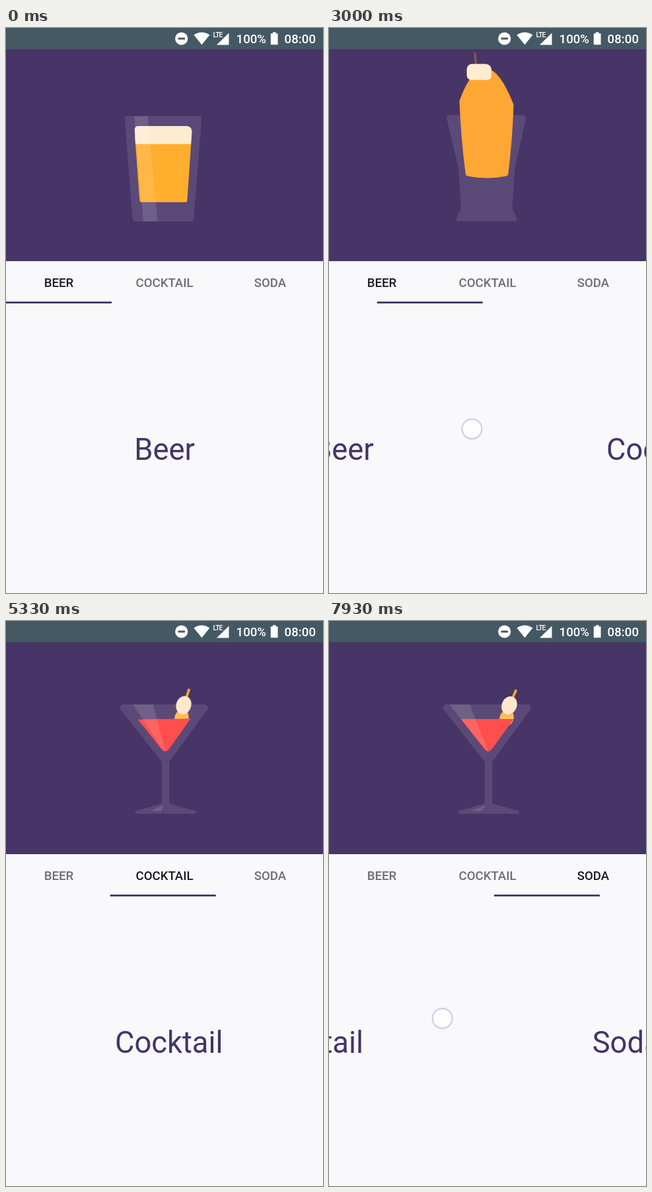
Recreate the animation shown at these times as an HTML page with a canvas. Size 480x853 px, loop 8000 ms.

```html
<!DOCTYPE html>
<html lang="en">
<head>
<meta charset="utf-8">
<title>Drinks pager</title>
<style>
html, body { margin: 0; width: 100%; height: 100%; overflow: hidden; background: #f9f8fb; }
canvas { display: block; width: 480px; height: 853px; }
</style>
</head>
<body>
<canvas id="stage" width="480" height="853"></canvas>
<script>
const ctx = document.getElementById('stage').getContext('2d');
const LOOP = 8000, W = 480, HERO_END = 352;
const FONT = 'Roboto, "Noto Sans", sans-serif';
const HERO = '#483567', BAR = '#455964', INK = '#433468', PAPER = '#f9f8fb';
const PAGES = ['Beer', 'Cocktail', 'Soda'];

const clamp = v => Math.max(0, Math.min(1, v));
const ramp = (v, a, b) => clamp((v - a) / (b - a));
const smooth = u => u * u * (3 - 2 * u);
const easeOut = u => u * (2 - u);
const mix = (a, b, u) => a.map((v, i) => v + (b[i] - v) * u);

// Keys are [position, ...values]; returns the blended values.
function at(keys, v) {
  let i = 0;
  while (i < keys.length - 2 && v > keys[i + 1][0]) i++;
  const a = keys[i], b = keys[i + 1];
  return mix(a, b, ramp(v, a[0], b[0])).slice(1);
}

// Pager position: a slow drag, a fling that settles, then a second drag.
function scroll(t) {
  const u = ramp(t, 1000, 4490);
  const drag = u + .096 * u * (1 - u);
  const settle = easeOut(ramp(t, 4490, 5600));
  return .762 * drag + .238 * settle + Math.max(0, t - 6090) * .0003055;
}

const TOUCHES = [
  { from: 1000, to: 4770, page: 0, x: 434.7, y: 614.8 },
  { from: 6070, to: LOOP, page: 1, x: 441.5, y: 600.4 }
];

// Right half of each glass: distance from centre, y, corner radius, centre
const TUMBLER = [[58.5, 133, 4, 238], [52.3, 212, 0, 238], [47.5, 272, 0, 238], [46.2, 288, 0, 238], [45.8, 292, 4, 238]];
const MARTINI = [[71.5, 126, 5, 239], [5.7, 212.5, 3, 241.5], [5.7, 275.5, 2, 241.5], [46, 287, 2, 241.5], [46, 291, 2, 241.5]];

// Body of the drink: top y, top half width, bottom y, bottom half width, side bulge, base drop, rounding
const BODY = [
  [.34, 165, 39.8, 260, 33, 0, 0, 6],
  [.584, 140, 35, 175, 24, 5, 13, 8],
  [.76, 148, 39, 191, 7, 0, 11, 1],
  [1, 148.5, 39.2, 191, 7, 0, 11, 1]
];
const TINT = [[.34, 255, 174, 46], [.584, 255, 160, 58], [.76, 255, 86, 80], [1, 255, 78, 78]];

// Garnish: x, y, degrees, scale
const GARNISH = [
  [.5, 223, 58, -6, .8], [.584, 224.5, 80.5, -3, .85], [.76, 250.5, 126.5, 8, .97],
  [.985, 269, 127, 19, 1], [1.1, 273, 127.4, 24, 1]
];

function poly(pts) {
  const n = pts.length, [x0, y0] = pts[0], [x1, y1] = pts[n - 1];
  ctx.beginPath();
  ctx.moveTo((x0 + x1) / 2, (y0 + y1) / 2);
  pts.forEach(([x, y, r = 0], i) => {
    const [nx, ny] = pts[(i + 1) % n];
    ctx.arcTo(x, y, nx, ny, r);
  });
  ctx.closePath();
}

function fillPoly(color, pts) {
  ctx.fillStyle = color;
  poly(pts);
  ctx.fill();
}

function oval(color, x, y, rx, ry, turn = 0) {
  ctx.fillStyle = color;
  ctx.beginPath();
  ctx.ellipse(x, y, rx, ry, turn, 0, 7);
  ctx.fill();
}

function text(str, x, y, size, weight, color, align = 'center') {
  ctx.font = `${weight} ${size}px ${FONT}`;
  ctx.textAlign = align;
  ctx.fillStyle = color;
  ctx.fillText(str, x, y);
}

function statusBar() {
  const white = '#fff';
  ctx.fillStyle = BAR;
  ctx.fillRect(0, 0, W, 32);
  oval(white, 265.7, 16, 9.6, 9.6);
  ctx.fillStyle = BAR;
  ctx.fillRect(260.5, 14.5, 10.5, 3);
  ctx.fillStyle = white;
  ctx.beginPath();
  ctx.moveTo(296.4, 25.2);
  ctx.lineTo(284.4, 10.6);
  ctx.quadraticCurveTo(296.4, 2.2, 308.4, 10.6);
  ctx.fill();
  fillPoly(white, [[337.5, 7.5], [337.5, 25.5], [319, 25.5]]);
  ctx.letterSpacing = '-1px';
  text('LTE', 313.5, 14, 10.5, 500, white, 'left');
  ctx.letterSpacing = '0px';
  ctx.fillRect(400.8, 8.3, 10.8, 16.9);
  ctx.fillRect(403.8, 6.3, 4.8, 3);
  text('100%', 371.3, 23, 18.67, 500, white);
  text('08:00', 445.3, 23, 18.67, 500, white);
}

function glass(p) {
  const u = smooth(ramp(p, .36, .68));
  const half = TUMBLER.map((v, i) => mix(v, MARTINI[i], u));
  const side = dir => half.map(([x, y, r, mid]) => [mid + dir * x, y, r]);
  fillPoly('rgba(255,255,255,.105)', [...side(1), ...side(-1).reverse()]);
}

function garnish(p) {
  const show = ramp(p, .43, .5);
  if (!show) return;
  const [x, y, deg, s] = at(GARNISH, p);
  ctx.save();
  ctx.globalAlpha = show;
  ctx.translate(x, y);
  ctx.rotate(deg * Math.PI / 180);
  ctx.scale(s, s);
  fillPoly('#ffa32e', [[-2, -26, 1.4], [2, -26, 1.4], [.9, 43], [-.9, 43]]);
  oval('#ffbd55', deg * .17, 19, 10.5, 12.8);
  if (p >= .5) oval('#fde8ca', 0, 0, 11.3, 14);
  ctx.restore();
}

// The drink leaps out of the tumbler, then sloshes to rest in the new glass.
function liquid(p) {
  const [top, wide, base, narrow, bulge, drop, round] = at(BODY, p);
  const u = ramp(p, .34, .76), rest = ramp(p, .584, 1.06), wake = ramp(p, .36, .584);
  const leap = Math.sin(Math.PI * ramp(p, .34, .56));
  const tilt = 7 * wake * (1 - rest) * Math.cos(Math.PI * rest * rest);
  const sag = 22 * wake * (1 - rest) ** 4;
  const mid = 238.1 + 1.5 * u, foot = 238.4 + 2.6 * u;
  const rim = top - 40 * leap, crest = top - 110 * leap, hip = (rim + base) / 2 + bulge;
  const bend = (wide + narrow) / 2 + bulge, centre = (mid + foot) / 2;

  ctx.beginPath();
  ctx.moveTo(mid - wide, rim - tilt);
  ctx.bezierCurveTo(mid - wide / 3, crest, mid + wide / 3, crest + sag, mid + wide, rim + tilt);
  ctx.quadraticCurveTo(centre + bend, hip, foot + narrow, base);
  ctx.quadraticCurveTo(foot, base + drop, foot - narrow, base);
  ctx.quadraticCurveTo(centre - bend, hip, mid - wide, rim - tilt);
  ctx.closePath();
  ctx.fillStyle = ctx.strokeStyle = `rgb(${at(TINT, p).map(Math.round)})`;
  ctx.lineWidth = round;
  ctx.lineJoin = 'round';
  ctx.fill();
  ctx.stroke();
}

// The foam lifts off and shrinks into the upper garnish.
function foam(p) {
  if (p >= .5) return;
  const u = ramp(p, .34, .5), rise = 103.5 * easeOut(u);
  const flat = [[194.5, 148, 5], [282.2, 148, 8], [280, 175.2, 0], [196, 175.2, 0]];
  const round = [[214, 150, 9], [232, 150, 9], [232, 173, 9], [214, 173, 9]];
  const pts = flat.map((v, i) => mix(v, round[i], u)).map(([x, y, r]) => [x, y - rise, r]);
  fillPoly('#fdebd2', pts);
}

function shine(p) {
  const beer = 1 - ramp(p, .34, .42), martini = ramp(p, .8, .95);
  if (beer) {
    fillPoly(`rgba(255,255,255,${.12 * beer})`, [[194, 133], [214.5, 133], [229.5, 292], [208, 292]]);
  }
  if (martini) {
    const color = `rgba(255,255,255,${.12 * martini})`, dx = 20 * (1 - ramp(p, .87, 1.1));
    fillPoly(color, [[182.5 + dx, 126], [213 + dx, 126], [241, 196], [238, 195]]);
    fillPoly(color, [[238, 278], [231 + dx * .4, 287], [214 + dx * .4, 287]]);
  }
}

function drops(p) {
  if (p > .48 && p < .65) oval('#ffa03a', 214, 112.5 + (p - .584) * 330, 1.8, 3, .5);
  if (p > .67 && p < .83) {
    const fall = (p - .76) * 200;
    oval('#ff5750', 260.5, 133 + fall, 1.6, 3.2);
    oval('#ff5750', 263.7, 141 + fall * .7, 2, 3.6);
  }
}

function hero(p) {
  ctx.save();
  ctx.beginPath();
  ctx.rect(0, 32, W, HERO_END - 32);
  ctx.clip();
  ctx.fillStyle = HERO;
  ctx.fillRect(0, 32, W, HERO_END - 32);
  for (const part of [glass, garnish, liquid, foam, shine, drops]) part(p);
  ctx.restore();
}

function pager(p) {
  PAGES.forEach((name, i) => {
    const color = i === Math.round(p) ? '#1c1921' : '#706c75';
    text(name.toUpperCase(), 80 + i * 160, 391, 18.67, 500, color);
    text(name, 240 + (i - p) * W, 652, 45.33, 400, INK);
  });
  ctx.fillStyle = INK;
  ctx.fillRect(p * 160, 413, 160, 2.8);
}

// The finger follows the page along a shallow thumb arc.
function touch(t, p) {
  for (const f of TOUCHES) {
    if (t < f.from || t > f.to + 80) continue;
    const shift = (p - f.page) * W, d = 275 - shift;
    ctx.globalAlpha = 1 - ramp(t, f.to, f.to + 80);
    oval('rgba(255,255,255,.75)', f.x - shift, f.y - .065 * d - .0018 * d * d, 15, 15);
    ctx.strokeStyle = '#cbd2e6';
    ctx.lineWidth = 2.3;
    ctx.stroke();
    ctx.globalAlpha = 1;
  }
}

function draw(now) {
  const t = now % LOOP, p = scroll(t);
  ctx.fillStyle = PAPER;
  ctx.fillRect(0, 0, W, 853);
  hero(p);
  statusBar();
  pager(p);
  touch(t, p);
}

let start;
function tick(now) {
  start ??= now;
  draw(now - start);
  requestAnimationFrame(tick);
}
draw(0);
requestAnimationFrame(tick);
</script>
</body>
</html>
```
